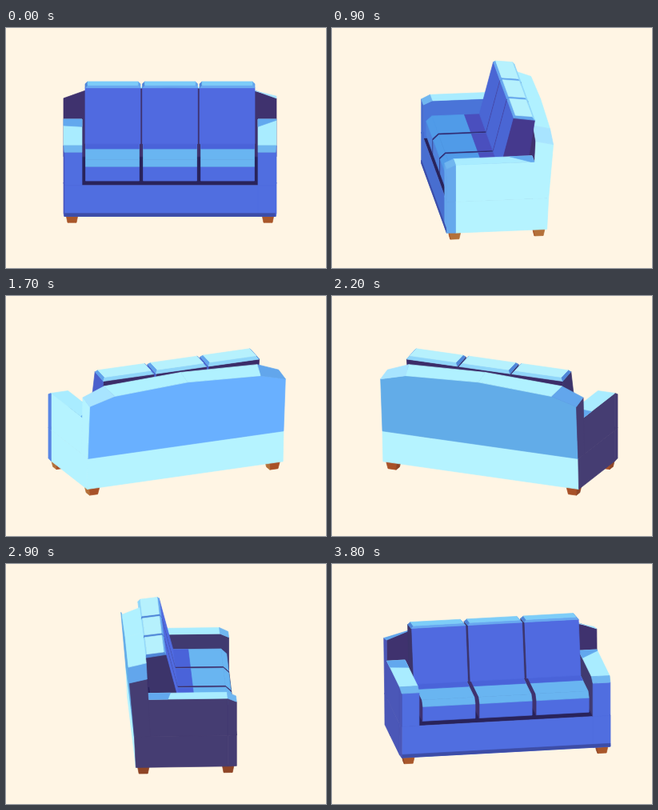
Animation of 400 by 300 pixels, one loop 3.9 s. Source, as an HTML page:

```html
<!DOCTYPE html>
<html lang="en">
<head>
<meta charset="utf-8">
<title>Turning sofa</title>
<style>
html, body { margin: 0; width: 100%; height: 100%; overflow: hidden; background: #fff5e4; }
svg { display: block; width: 100vw; height: 100vh; }
polygon { stroke-width: .7; stroke-linejoin: round; }
</style>
</head>
<body>
<svg id="stage" viewBox="0 0 400 300" xmlns="http://www.w3.org/2000/svg"></svg>
<script>
const STEP = 100, COUNT = 39;
const SIN_E = 0.333, COS_E = 0.943;
const stage = document.getElementById('stage');

const clamp = v => Math.max(0, Math.min(1, v));
const channels = hex => [1, 3, 5].map(i => parseInt(hex.slice(i, i + 2), 16));
function mix(a, b, t) {
  const p = channels(a), q = channels(b);
  return 'rgb(' + p.map((v, i) => Math.round(v + (q[i] - v) * clamp(t))) + ')';
}

// Colours; some shift with the sine and cosine of the view angle.
const NAVY = '#29235a', PURPLE = '#3f326e', CYAN = '#b5f3ff';
const front = s => mix('#506ee0', '#486ed0', s * 1.6);
const rightEdge = s => mix('#506ee0', '#66a8ec', s * 1.1);
const seatFront = s => mix('#4f6ce0', '#4f82dc', s * 1.6);
const backrest = s => mix('#506ae0', '#4a66d4', s * 1.6);
const backrestSide = s => mix('#4a60cc', '#45388c', s * 2.5 - 1.5);
const seatTop = s => mix('#69b5f1', '#509be8', s);
const seatShade = s => mix('#4a63d9', '#4a4fbe', s);
const rear = s => mix('#62ace8', '#69b0ff', (s + 0.4) / 0.8);
const leftSide = (s, c) => mix('#453d72', '#4c5ac0', c < 0 ? 0 : (s + 0.5) * 2.6);
const cushionTop = (s, c) => mix('#7cccf8', '#b6f1fd', 1.6 - c * 1.6);

const sub = (a, b) => a.map((v, i) => v - b[i]);
const dot = (a, b) => a[0] * b[0] + a[1] * b[1] + a[2] * b[2];
const cross = (a, b) => [
  a[1] * b[2] - a[2] * b[1],
  a[2] * b[0] - a[0] * b[2],
  a[0] * b[1] - a[1] * b[0]
];

// A part is a list of [colour, points]; normals point away from its centre.
function part(center, faces) {
  return faces.map(([color, pts]) => {
    let n = cross(sub(pts[1], pts[0]), sub(pts[2], pts[0]));
    if (dot(n, sub(pts[0], center)) < 0) n = n.map(v => -v);
    return { color, pts, n };
  });
}

// Rectangle lying between two z,y points, spanning x0 to x1.
const span = (x0, x1, [z0, y0], [z1, y1]) =>
  [[x0, y0, z0], [x1, y0, z0], [x1, y1, z1], [x0, y1, z1]];
const sideOf = (x, profile) => profile.map(([z, y]) => [x, y, z]);

const WIDE = 133, EDGE = 132, FRONT = 78, BEVEL = 67, FLOOR = 41;

function leg(sx, z0) {
  const x0 = sx > 0 ? 115 : -130, x1 = x0 + 15, z1 = z0 + 15;
  const top = [[x0, 1, z0], [x1, 1, z0], [x1, 1, z1], [x0, 1, z1]];
  const low = [[x0 + 2, -10, z0 + 2], [x1 - 2, -10, z0 + 2], [x1 - 2, -10, z1 - 2], [x0 + 2, -10, z1 - 2]];
  const tint = ['#a85128', '#b4713a', '#a9572a', '#8f4526'];
  return part([x0 + 7, -5, z0 + 7], tint.map((color, i) => {
    const j = (i + 1) % 4;
    return [color, [top[i], top[j], low[j], low[i]]];
  }));
}

const sideProfile = [[-48, 0], [BEVEL, 0], [BEVEL, FLOOR], [-50, FLOOR]];
const corner = (sx, y0, y1, y2) => [
  [sx * EDGE, y0, FRONT], [sx * WIDE, y0, BEVEL],
  [sx * WIDE, y2, BEVEL], [sx * EDGE, y1, FRONT]
];

const base = part([0, 20, 10], [
  [NAVY, span(-EDGE, EDGE, [-48, FLOOR], [FRONT, FLOOR])],
  [front, span(-EDGE, EDGE, [FRONT, 0], [FRONT, FLOOR])],
  [rightEdge, span(110, EDGE, [FRONT, 0], [FRONT, FLOOR])],
  ['#3d4da6', span(-EDGE, EDGE, [FRONT, 0], [FRONT, 4])],
  [CYAN, span(-WIDE, WIDE, [-48, 0], [-50, FLOOR])],
  [leftSide, sideOf(-WIDE, sideProfile)],
  [CYAN, sideOf(WIDE, sideProfile)],
  [leftSide, corner(-1, 0, FLOOR, FLOOR)],
  [rightEdge, corner(1, 0, FLOOR, FLOOR)]
]);

function arm(sx) {
  const a = sx * 110, b = sx * WIDE, m = sx * EDGE, right = sx > 0;
  const outline = [[BEVEL, FLOOR], [BEVEL, 90], [-36, 90], [-36, FLOOR]];
  const inner = [[FRONT, FLOOR], [FRONT, 85], [BEVEL, 90], [-30, 90], [-30, FLOOR]];
  return part([sx * 120, 65, 20], [
    [right ? CYAN : leftSide, sideOf(b, outline)],
    [right ? '#403a70' : '#4a74d8', sideOf(a, inner)],
    [right ? rightEdge : front, span(a, m, [FRONT, FLOOR], [FRONT, 85])],
    [right ? rightEdge : leftSide, corner(sx, FLOOR, 85, 90)],
    ['#a9ecff', span(a, b, [BEVEL, 90], [-32, 90])],
    ['#62a8ee', [[a, 90, -32], [b, 90, -32], [b, 90, right ? -28 : -8], [a, 90, -4]]],
    ['#70b6f0', [[a, 90, BEVEL], [b, 90, BEVEL], [m, 85, FRONT], [a, 85, FRONT]]]
  ]);
}

function panel() {
  const ys = [117, 128, 132, 128, 117], drop = [5, 7, 6, 7, 5];
  const fx = [-WIDE, -104, 0, 104, WIDE], bx = [-WIDE, -99, 0, 99, WIDE];
  const f = fx.map((x, i) => [x, ys[i], -34]);
  const r = bx.map((x, i) => [x, ys[i] - drop[i], -56]);
  const tops = ['#62a6ec', '#b0f1ff', '#b0f1ff', '#a8e4ff'];
  const side = [[-30, FLOOR], [-34, 117], [-56, 112], [-50, FLOOR]];
  return part([0, 75, -42], [
    [PURPLE, [[-WIDE, FLOOR, -30], [WIDE, FLOOR, -30], ...f.slice().reverse()]],
    [rear, [[-WIDE, FLOOR, -50], [WIDE, FLOOR, -50], ...r.slice().reverse()]],
    [leftSide, sideOf(-WIDE, side)],
    [CYAN, sideOf(WIDE, side)],
    ...tops.map((color, i) => [color, [f[i], f[i + 1], r[i + 1], r[i]]])
  ]);
}

function seat(i) {
  const x0 = i * 72 - 33.5, x1 = i * 72 + 33.5;
  const profile = [[-26, 46], [75, 46], [75, 65], [68, 71.5], [-26, 71.5]];
  return part([i * 72, 58, 25], [
    [seatFront, span(x0, x1, [75, 46], [75, 65])],
    [seatTop, span(x0, x1, [75, 65], [68, 71.5])],
    [seatTop, span(x0, x1, [68, 71.5], [-26, 71.5])],
    [seatShade, span(x0, x1, [27, 71.5], [-26, 71.5])],
    [PURPLE, sideOf(x0, profile)],
    ['#312c72', sideOf(x1, profile)]
  ]);
}

function cushion(i) {
  const x0 = i * 71.5 - 34.5, x1 = i * 71.5 + 34.5;
  const rim = [[x0, 139.5, -9.5], [x1, 139.5, -9.5], [x1, 135.5, -36], [x0, 135.5, -36]];
  const top = [[x0 + 3, 142, -12], [x1 - 3, 142, -12], [x1 - 3, 139.5, -33], [x0 + 3, 139.5, -33]];
  const profile = [[8, 71.5], [-9.5, 139.5], [-36, 135.5], [-26, 71.5]];
  const bevels = ['#68a8f0', '#62a4ec', '#90d6fa', '#4f86d8'];
  return part([i * 71.5, 105, -16], [
    [backrest, span(x0, x1, [8, 71.5], [-9.5, 139.5])],
    ['#3b2c68', span(x0, x1, [-26, 71.5], [-36, 135.5])],
    ['#3c346a', sideOf(x0, profile)],
    [backrestSide, sideOf(x1, profile)],
    ...bevels.map((color, k) => {
      const j = (k + 1) % 4;
      return [color, [rim[k], rim[j], top[j], top[k]]];
    }),
    [cushionTop, top]
  ]);
}

const legs = [leg(-1, -46), leg(1, -46), leg(-1, 60), leg(1, 60)];
const arms = { left: arm(-1), right: arm(1) };
const back = panel();
const seats = [-1, 0, 1].map(seat);
const cushions = [-1, 0, 1].map(cushion);

// Parts from far to near.
function ordered(s, c) {
  const row = [arms.left, ...seats, ...cushions, arms.right];
  const mirrored = [arms.right, ...seats.slice().reverse(), ...cushions.slice().reverse(), arms.left];
  const middle = s >= 0 ? row : mirrored;
  return [...legs, base, ...(c > 0 ? [back, ...middle] : [...middle, back])];
}

function project([x, y, z], s, c) {
  const px = 205 + x * c - z * s;
  const py = 209.5 - y * COS_E + (x * s + z * c) * SIN_E;
  return px.toFixed(2) + ',' + py.toFixed(2);
}

function draw(step) {
  const turn = step / COUNT * Math.PI * 2;
  const s = Math.sin(turn), c = Math.cos(turn);
  const eye = [s * COS_E, SIN_E, c * COS_E];
  let out = '<rect width="400" height="300" fill="#fff5e4"/>';
  for (const faces of ordered(s, c)) {
    for (const { color, pts, n } of faces) {
      if (dot(n, eye) <= 0) continue;
      const fill = typeof color === 'function' ? color(s, c) : color;
      const points = pts.map(p => project(p, s, c)).join(' ');
      out += `<polygon points="${points}" fill="${fill}" stroke="${fill}"/>`;
    }
  }
  stage.innerHTML = out;
}

let shown = 0;
const start = performance.now();
function tick() {
  const step = Math.floor(Math.max(0, performance.now() - start) / STEP) % COUNT;
  if (step !== shown) draw(shown = step);
  requestAnimationFrame(tick);
}
draw(0);
requestAnimationFrame(tick);
</script>
</body>
</html>
```
